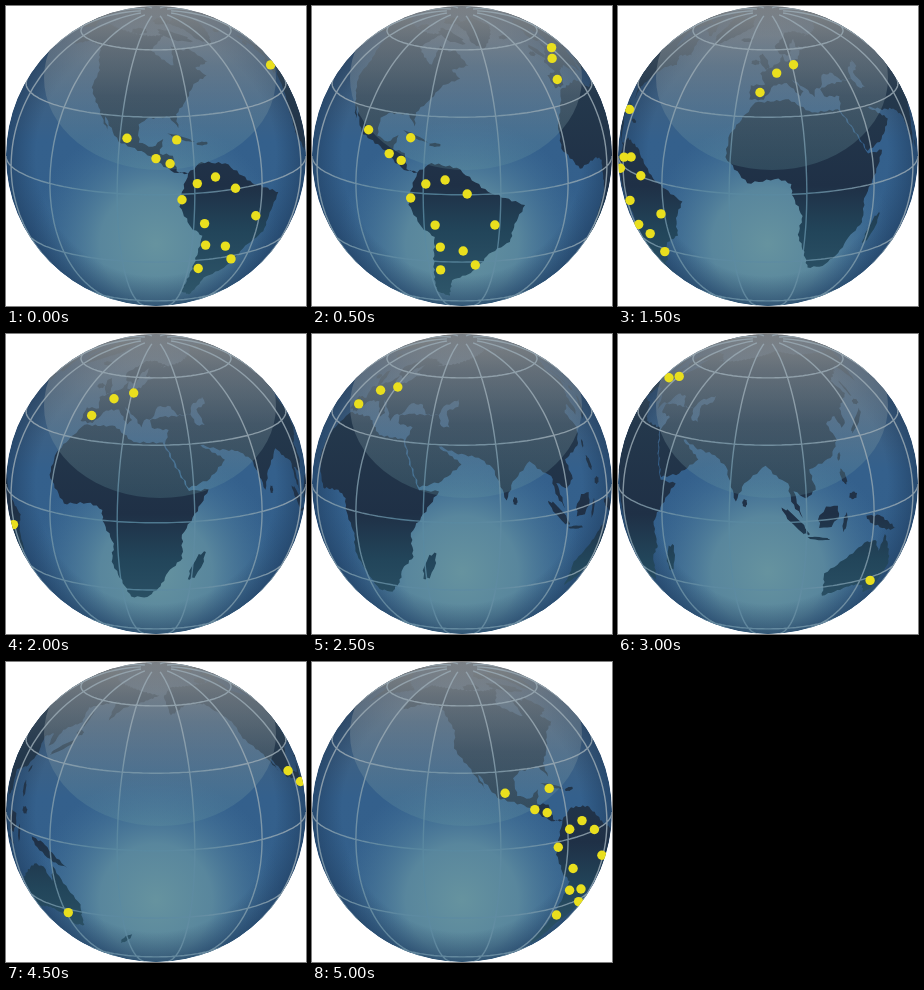
Write an HTML page that moves like this. It is 300 by 300 pixels and loops after 5500 ms.

```html
<!DOCTYPE html>
<html lang="en">
<head>
<meta charset="utf-8">
<title>Rotating globe</title>
<style>
html, body { margin: 0; width: 100%; height: 100%; overflow: hidden; background: #fff; }
svg { display: block; width: 100vw; height: 100vh; }
</style>
</head>
<body>
<svg viewBox="0 0 300 300">
  <defs>
    <linearGradient id="ocean" x2="0" y2="1">
      <stop offset="0" stop-color="#6c7780"/>
      <stop offset=".2" stop-color="#45617d"/>
      <stop offset=".45" stop-color="#34608c"/>
      <stop offset="1" stop-color="#335f8a"/>
    </linearGradient>
    <radialGradient id="glow" gradientUnits="userSpaceOnUse" cx="150" cy="238" r="125">
      <stop offset="0" stop-color="#66939f"/>
      <stop offset=".45" stop-color="#5f8da0" stop-opacity=".85"/>
      <stop offset="1" stop-color="#44749c" stop-opacity="0"/>
    </radialGradient>
    <radialGradient id="rim">
      <stop offset=".8" stop-color="#1d3a5c" stop-opacity="0"/>
      <stop offset="1" stop-color="#1d3a5c" stop-opacity=".6"/>
    </radialGradient>
    <linearGradient id="land" gradientUnits="userSpaceOnUse" x1="0" y1="0" x2="0" y2="300">
      <stop offset="0" stop-color="#4c5a66"/>
      <stop offset=".3" stop-color="#24384c"/>
      <stop offset=".6" stop-color="#1f3046"/>
      <stop offset=".75" stop-color="#22455a"/>
      <stop offset="1" stop-color="#30586c"/>
    </linearGradient>
    <linearGradient id="gloss" x2="0" y2="1">
      <stop offset="0" stop-color="#96918b" stop-opacity=".85"/>
      <stop offset=".3" stop-color="#8f9498" stop-opacity=".48"/>
      <stop offset=".6" stop-color="#8599a3" stop-opacity=".32"/>
      <stop offset="1" stop-color="#6397a1" stop-opacity=".24"/>
    </linearGradient>
    <radialGradient id="wire" gradientUnits="userSpaceOnUse" cx="135" cy="215" r="150">
      <stop offset="0" stop-color="#5488a0" stop-opacity=".8"/>
      <stop offset=".4" stop-color="#5f8ba2" stop-opacity=".8"/>
      <stop offset="1" stop-color="#98a8b2" stop-opacity=".85"/>
    </radialGradient>
    <clipPath id="disc"><circle cx="150" cy="150" r="150"/></clipPath>
  </defs>
  <g clip-path="url(#disc)">
    <circle cx="150" cy="150" r="150" fill="url(#ocean)"/>
    <circle cx="150" cy="150" r="150" fill="url(#glow)"/>
    <circle cx="150" cy="150" r="150" fill="url(#rim)"/>
    <g id="coasts" fill="url(#land)"></g>
    <ellipse cx="154" cy="72" rx="116" ry="92" fill="url(#gloss)"/>
    <path id="grid" fill="none" stroke="url(#wire)" stroke-width="1.4"/>
    <g id="dots" fill="#e9df1e"></g>
  </g>
</svg>
<script>
const STEP_MS = 500, R = 150, RAD = Math.PI / 180;
const sinTilt = Math.sin(15 * RAD), cosTilt = Math.cos(15 * RAD);
const el = id => document.getElementById(id);
const pairs = list => list.flatMap((v, i) => i % 2 ? [] : [[v, list[i + 1]]]);

const shapes = [];

// Joins longitude, latitude corners with a slightly ragged coast
function land(...corners) {
  const pts = pairs(corners), shape = [];
  pts.forEach(([lon, lat], i) => {
    const [lon2, lat2] = pts[(i + 1) % pts.length];
    const dx = lon2 - lon, dy = lat2 - lat, size = Math.hypot(dx, dy);
    const n = Math.ceil(size / 1.6);
    for (let k = 0; k < n; k++) {
      const t = k / n, bump = k ? .4 * Math.sin(k * 2.3 + lon + lat) / size : 0;
      shape.push([lon + dx * t - dy * bump, lat + dy * t + dx * bump]);
    }
  });
  shapes.push(shape);
}

// A pointed oval around a centre, sizes in degrees of arc
function island(lon, lat, length, width, turn = 0) {
  const c = Math.cos(turn * RAD), s = Math.sin(turn * RAD), stretch = Math.cos(lat * RAD);
  shapes.push(Array.from({ length: 16 }, (_, i) => {
    const a = i * Math.PI / 8, wobble = 1 + .15 * Math.sin(i * 2.4 + lon);
    const u = length * wobble * Math.cos(a), v = width * wobble * Math.sin(a);
    return [lon + (u * c - v * s) / stretch, lat + u * s + v * c];
  }));
}

// North America, South America
land(-166,65, -157,71, -128,70, -95,68, -82,69, -94,60, -82,53, -79,52, -78,62, -70,59,
  -65,60, -56,52, -66,50, -61,46, -70,43, -76,36, -81,31, -80.5,25.5, -84,30, -94,29.5,
  -97.5,27, -97,20, -91.5,18.5, -87,21.5, -88.5,16, -83.3,15, -82,9, -77.5,8, -83,8.5,
  -94.5,16.2, -105.5,20, -114,31, -110,23, -117,32.5, -124,40, -124,48, -135,59, -150,60, -163,55);
land(-77.5,8, -72,12, -62,10.5, -50,1, -35,-5.5, -39,-13, -40,-21, -48.5,-26, -53,-33.5,
  -57,-37, -65,-41, -68,-54, -75,-50, -71,-18, -76,-14, -81,-5, -80,1);
// Africa
land(-6,35.8, 10,37, 20,31, 33,31, 43,12, 51,12, 40,-5, 40.5,-15, 35,-21, 32,-28, 26,-34,
  18.5,-34, 12,-17, 13.5,-9, 9,0, 9,4, 4,6.3, -8,4.4, -17,14, -16,23, -10,31);
// Europe
land(-9,37, -9,43, -1.5,43.5, -4.5,48.3, 8,54, 10,57.5, 11,54, 20,54.5, 24,59, 30,60, 22,61,
  24,65.5, 17.5,62, 16,56.5, 8,58, 5.5,62, 19,70, 30,70, 41,67, 34,66, 45,67, 60,69, 60,50,
  50,46, 48,42, 41,42, 38,46, 31,46, 28,41, 24,40, 23,37, 19.5,41, 13,45.5, 18,40, 16,38,
  10,44, 3,43, -2,37);
// Asia
land(27,40, 28,37, 36,36, 34,30.5, 43,13, 52,16, 59.8,22.5, 56,25.5, 48,30, 57,27, 67,25,
  72.5,21, 77.5,8, 80.5,15, 89,22, 94.3,17, 98,15, 99,8, 103.5,1.4, 100,12, 105,9, 109,12,
  107,20, 117,23.5, 122,30, 119,37, 125,39.7, 126.5,34.5, 129.3,36, 130,42.5, 140,48, 136,55,
  155,61, 157,51, 163,58, 180,63, 190,66, 160,70, 127,73, 104,77.5, 73,72, 58,69, 58,46,
  52,44, 54,37, 50,37.5, 48,42, 32,41.5);
// Australia, New Guinea, Greenland
land(114,-23, 122,-18, 131,-12, 137,-12, 140.5,-17.5, 142.5,-10.7, 153,-26, 150,-37.5,
  144,-38.5, 138,-33, 131,-31.5, 116,-35);
land(131,-1, 138,-2, 150,-10, 143,-9, 133,-4);
land(-70,77, -35,83, -20,74, -43,60, -52,64, -55,71);

island(-73,68, 7,2.2,-38);
island(-110,71, 3,2);
island(-80,79, 3,3);
island(-2.5,54, 4,1.4,110);
island(-8,53.5, 1.6,1.2);
island(-19,65, 2.3,1.2);
island(-79.7,21.7, 5,.6,-20);
island(-71,19, 2.3,.7);
island(46.7,-19, 6.5,1.9,70);
island(81,7.5, 1.5,.9,90);
island(100.7,0, 7.5,1.4,-47);
island(110,-7.3, 4.5,.6,-10);
island(114,1, 5,3.6,45);
island(121,-2, 3.5,.9,80);
island(121.5,15.7, 3,1.1,105);
island(125,8, 1.8,1.4);
island(121,23.6, 1.6,.6,70);
island(137,36, 6.3,1,40);
island(143,43.4, 1.6,1.2);
island(142.8,50, 4,.5,90);
island(171,-43.5, 4,1,50);

// Markers and the central longitude of each step
const places = pairs([
  -102,21.5, -81.5,21, -90,14, -84.5,12, -74,3.8, -66.5,5.7, -58,.3, -80,-2.2, -70.6,-12.7,
  -47,-12.8, -59.5,-24.3, -69,-22.6, -54,-31.7, -70,-34.7, -4,40, 5,48.5, 16,52, 143.4,-32
]);
const centers = [-90, -60, -30, 0, 30, 60, 90, 112, 135, 187, 240];

function project(lon, lat, center) {
  const a = (lon - center) * RAD, b = lat * RAD;
  const x = Math.cos(b) * Math.sin(a), d = Math.cos(b) * Math.cos(a), s = Math.sin(b);
  return { x, y: s * cosTilt - d * sinTilt, z: s * sinTilt + d * cosTilt };
}

const screen = ({ x, y }) => [R + R * x, R - R * y].map(v => v.toFixed(1));

// Hidden points slide out to the limb
function toLimb(p) {
  if (p.z >= 0) return p;
  const r = Math.hypot(p.x, p.y) || 1;
  return { x: p.x / r, y: p.y / r };
}

function coast(shape, center) {
  const pts = shape.map(([lon, lat]) => project(lon, lat, center));
  if (pts.every(p => p.z < 0)) return "";
  return `<path d="M${pts.map(p => screen(toLimb(p)).join(" ")).join("L")}Z"/>`;
}

function marker([lon, lat], center) {
  const p = project(lon, lat, center);
  if (p.z < .15) return "";
  const [x, y] = screen(p);
  return `<circle cx="${x}" cy="${y}" r="4.7"/>`;
}

function line(pointAt, from, to) {
  let d = "", pen = false;
  for (let v = from; v <= to; v += 2) {
    const p = project(...pointAt(v), 0);
    if (p.z >= 0) d += (pen ? "L" : "M") + screen(p).join(" ");
    pen = p.z >= 0;
  }
  return d;
}

function gridPath() {
  let d = "";
  for (let lat = -60; lat <= 60; lat += 30) d += line(v => [v, lat], -180, 180);
  for (let lon = -165; lon < 180; lon += 30) d += line(v => [lon, v], -90, 84);
  return d;
}

const views = centers.map(center => ({
  coasts: shapes.map(shape => coast(shape, center)).join(""),
  dots: places.map(place => marker(place, center)).join("")
}));

el("grid").setAttribute("d", gridPath());

let shown = -1;
function render(time) {
  const step = Math.floor(time / STEP_MS) % views.length;
  if (step === shown) return;
  shown = step;
  el("coasts").innerHTML = views[step].coasts;
  el("dots").innerHTML = views[step].dots;
}

const start = performance.now();
function tick() {
  render(performance.now() - start);
  requestAnimationFrame(tick);
}
tick();
</script>
</body>
</html>
```
